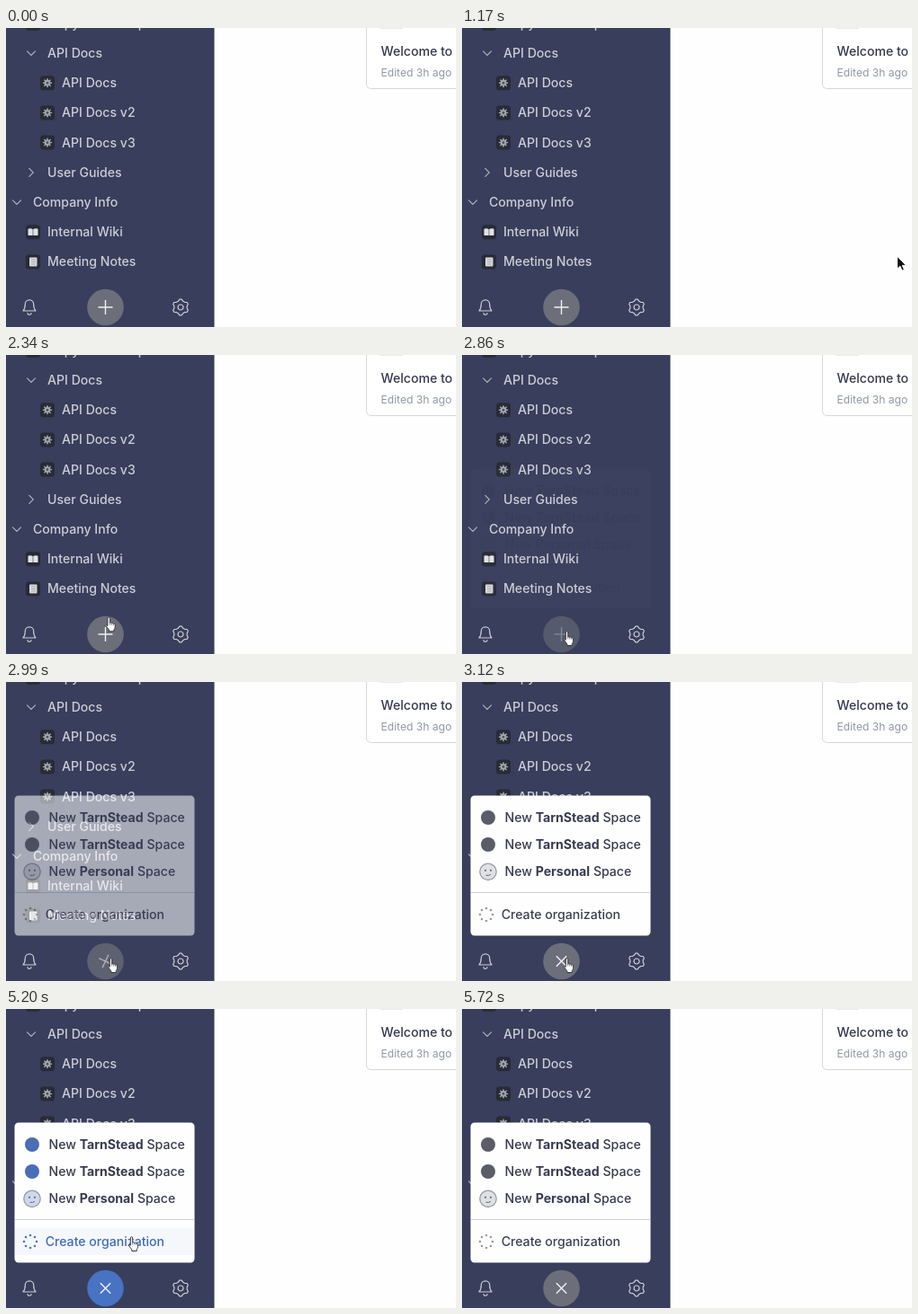
An HTML page for the animation above (6370 ms loop, 500x333 px).

```html
<!DOCTYPE html>
<html lang="en">
<head>
<meta charset="utf-8">
<title>Create a space</title>
<style>
  html, body { margin: 0; width: 100%; height: 100%; overflow: hidden; background: #fefefe; }
  svg { display: block; width: 500px; height: 333px; }
  text { font: 500 14.1px Inter, sans-serif; white-space: pre; }
  .side { fill: #cccdd6; }
  .line { fill: none; stroke: #cccdd6; stroke-width: 1.2; stroke-linecap: round; stroke-linejoin: round; }
  .chevron { stroke: #b0b3c1; }
  #menu { --mark: #5a5d68; --ink: #3c3f51; --dots: #9a9ca4; --face: #dfe0e4; }
  #menu text { fill: #383b4f; }
  #menu .bold { font-weight: 700; }
  #menu .action { fill: var(--ink); }
  #disc { fill: #6c6f79; }
  .hot #menu { --mark: #4a6db5; --ink: #3f6bba; --dots: #4a78c4; --face: #ced8ec; }
  .hot #disc { fill: #4872c2; }
  #highlight { fill: none; }
  .hot #highlight { fill: #f5f7fb; }
</style>
</head>
<body>
<svg id="stage" viewBox="0 0 500 333"></svg>
<script>
const LOOP = 6370, STEP = 130, PITCH = 33.2, FIRST_ROW = 28;
const stage = document.getElementById('stage');

const at = (x, y, content) => `<g transform="translate(${x} ${y})">${content}</g>`;
const label = (x, y, content, attrs = 'class="side"') =>
  `<text x="${x}" y="${y + 5}" ${attrs}>${content}</text>`;
const ring = (count, radius, draw) => Array.from({ length: count }, (_, i) => {
  const a = i / count * 2 * Math.PI;
  return draw(radius * Math.cos(a), radius * Math.sin(a));
}).join('');

// Toothed outline: every tooth takes four corners, two outside and two inside.
function gear(teeth, inner, outer) {
  const points = [];
  for (let i = 0; i < teeth * 4; i++) {
    const r = i % 4 < 2 ? outer : inner, a = (i - 0.5) / (teeth * 2) * Math.PI - Math.PI / 2;
    points.push(`${(r * Math.cos(a)).toFixed(2)},${(r * Math.sin(a)).toFixed(2)}`);
  }
  return `<polygon points="${points.join(' ')}"/>`;
}

const tile = '<rect x="-8" y="-8" width="16" height="16" rx="3.5" fill="#282b35"/>';
const icons = {
  down: '<path class="line chevron" d="M-4.5-2.2 0 2.3 4.5-2.2"/>',
  right: '<path class="line chevron" d="M-2.2-4.5 2.3 0-2.2 4.5"/>',
  cog: `${tile}<g fill="#a2a5ad">${gear(8, 3.3, 5.2)}</g><circle r="1.3" fill="#4a4d56"/>`,
  book: `${tile}<path fill="#e2e3e7" d="M-5.5-3.5Q-2.5-4.5 0-3Q2.5-4.5 5.5-3.5V3.8H-5.5z"/>
    <path stroke="#777b86" d="M0-3V3.8"/>`,
  note: `${tile}<rect x="-4" y="-5" width="8.5" height="10" rx="1" fill="#d8d9de"/>
    <path stroke="#9a9da6" stroke-width=".8" d="M-2-2.5H3M-2 0H3M-2 2.5H3"/>`
};

const rows = [
  [30, 'note', 'Copywriter Help'],
  [28, 'down', 'API Docs'],
  [46, 'cog', 'API Docs'],
  [46, 'cog', 'API Docs v2'],
  [46, 'cog', 'API Docs v3'],
  [28, 'right', 'User Guides'],
  [12, 'down', 'Company Info'],
  [30, 'book', 'Internal Wiki'],
  [30, 'note', 'Meeting Notes']
];
const list = rows.map(([x, icon, name], i) => {
  const y = FIRST_ROW + (i - 1) * PITCH;
  return at(x, y, icons[icon]) + label(icon === 'down' || icon === 'right' ? x + 18 : x + 16, y, name);
}).join('');

const space = (y, name, icon) => at(29, y, icon) +
  label(47.5, y, `New <tspan class="bold">${name}</tspan> Space`, '');
const mark = '<circle r="8" fill="var(--mark)"/>';
const face = `<circle r="9.2" fill="var(--face)" stroke="#9a9ca6" stroke-width="1.3"/>
  <circle cx="-3" cy="-1.5" r="1.1" fill="#666a76"/><circle cx="3" cy="-1.5" r="1.1" fill="#666a76"/>
  <path d="M-2.5 4Q.5 4.6 3 3.2" fill="none" stroke="#666a76"/>`;

stage.innerHTML = `
  <rect width="500" height="333" fill="#fefefe"/>
  <rect x="400.5" y="-20" width="140" height="87.5" rx="5" fill="#fff" stroke="#d5d7de"/>
  <path d="M415 0H441" stroke="#d5d7de"/>
  ${label(416.5, 26, 'Welcome to', 'fill="#34374f"')}
  ${label(416.5, 49.3, 'Edited 3h ago', 'fill="#9297a5" style="font-size:12.1px;font-weight:400"')}
  <rect width="231.5" height="333" fill="#383e5b"/>
  <g id="hover">
    <rect y="-16.6" width="231.5" height="${PITCH}" fill="#313551"/>
    <g class="side">${[-5, 0, 5].map(y => `<circle cx="202.3" cy="${y}" r="1.2"/>`).join('')}</g>
  </g>
  ${list}
  ${at(26, 310.5, `<path class="line" d="M-7 4.5H7Q4.7 2 4.7-3a4.7 4.7 0 0 0-9.4 0Q-4.7 2-7 4.5zM-2 7.2a2 1.6 0 0 0 4 0"/>`)}
  ${at(194, 311, `<g class="line">${gear(6, 7.2, 9)}<circle r="3"/></g>`)}
  ${at(110.5, 311, `<circle id="disc" r="20.3"/>
    <path id="plus" d="M-8 0H8M0-8V8" stroke="#f1f1f4" stroke-width="1.4"/>`)}
  <g id="menu">
    <rect x="9.5" y="126.5" width="200" height="156" rx="4.5" fill="#fefefe"/>
    <rect id="highlight" x="10" y="244" width="199" height="30"/>
    ${space(151, 'TarnStead', mark)}
    ${space(181, 'TarnStead', mark)}
    ${space(211.3, 'Personal', face)}
    <path d="M10 234.5H209" stroke="#d0d2d9"/>
    ${at(27, 259, `<g fill="var(--dots)">${ring(8, 7, (x, y) =>
      `<circle cx="${x.toFixed(2)}" cy="${y.toFixed(2)}" r="1.3"/>`)}</g>`)}
    ${label(43.7, 258.7, 'Create organization', 'class="action"')}
  </g>
  <g id="pointer" stroke-linejoin="round">
    <g id="hand" stroke="#3a3b42">
      <path fill="#fff" d="M3 1.5a1.2 1.2 0 0 1 2.4 0V6.5q1.2-.8 2 .3 1.3-.6 1.9.5 1.7-.3 1.9 1.2V11q0 2-1.2 3v2H4.5v-1.7Q2.5 12 1 9.6q.4-1.5 2 .2z"/>
      <path stroke-width=".6" d="M5.4 6.5V9M7.4 6.8V9.2M9.3 7.3V9.4"/>
    </g>
    <path id="arrow" fill="#111" stroke="#fff" d="M0 0V14L3.3 11 5.5 16 7.9 15 5.7 10.2H10z"/>
  </g>`;

const [hover, disc, plus, menu, pointer, hand, arrow] =
  ['hover', 'disc', 'plus', 'menu', 'pointer', 'hand', 'arrow'].map(id => document.getElementById(id));

// Pointer path: time, x, y; eased between stops.
const path = [
  [1040, 515, 262], [1820, 90, 156.5], [2470, 112.3, 307.5], [3250, 112.3, 307.5],
  [3770, 109.3, 253.5], [5070, 109.3, 253.5], [5200, 135.3, 253.5], [5590, 280, 250]
];
const smooth = (from, to, t) => {
  const u = Math.min(1, Math.max(0, (t - from) / (to - from)));
  return u * u * (3 - 2 * u);
};
function pointerAt(t) {
  let [, x, y] = path[0];
  for (let i = 1; i < path.length; i++) {
    const k = smooth(path[i - 1][0], path[i][0], t);
    x += (path[i][1] - path[i - 1][1]) * k;
    y += (path[i][2] - path[i - 1][2]) * k;
  }
  return [x, y];
}
const show = (node, on) => node.setAttribute('visibility', on ? 'visible' : 'hidden');

function render(t) {
  const [x, y] = pointerAt(t);
  const active = t >= 1170 && t < 5590;
  const inSidebar = x < 231;
  const opened = smooth(2838, 3120, t);
  const glow = t < 2800 ? 1 : Math.max(0.3, opened);

  pointer.setAttribute('transform', `translate(${x} ${y})`);
  show(hand, active && inSidebar);
  show(arrow, active && !inSidebar);

  show(hover, active && inSidebar && opened === 0 && y < 277);
  const row = Math.round((y - FIRST_ROW) / PITCH);
  hover.setAttribute('transform', `translate(0 ${FIRST_ROW + row * PITCH})`);

  menu.setAttribute('opacity', opened);
  plus.setAttribute('transform', `rotate(${45 * opened})`);
  plus.setAttribute('opacity', glow);
  disc.setAttribute('fill-opacity', 0.4 + 0.6 * glow);
  stage.classList.toggle('hot', active && opened === 1 && x < 209 && y < 276);
}

function tick() {
  render(Math.floor(performance.now() % LOOP / STEP) * STEP);
  requestAnimationFrame(tick);
}
tick();
</script>
</body>
</html>
```
